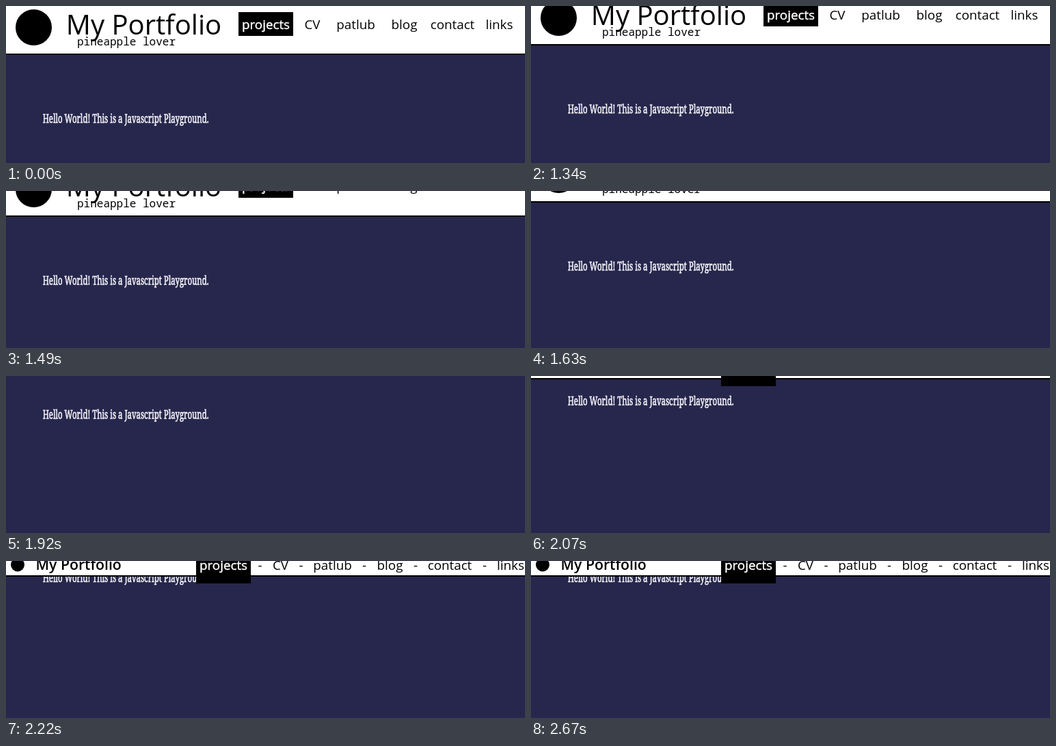
An HTML page that plays this animation: 759 by 231 pixels, repeating every 3.56 s.

```html
<!DOCTYPE html>
<html lang="en">
<head>
<meta charset="utf-8">
<title>My Portfolio</title>
<style>
  html, body { margin: 0; width: 100%; height: 100%; overflow: hidden; background: #27264c; }
  svg { display: block; width: 759px; height: 231px; }
  text { font-family: "Open Sans", "Noto Sans", sans-serif; white-space: pre; }
  .nav { font-size: 18.8px; text-anchor: middle; }
  .active { fill: #fff; stroke: #fff; stroke-width: .45px; }
  .title { font-size: 40px; text-anchor: middle; }
  .small { font-size: 21.2px; font-weight: 600; text-anchor: middle; }
  .tag { font: 16px "Noto Sans Mono", "DejaVu Sans Mono", monospace; }
  .hello {
    font: 11.43px "Noto Serif", serif;
    fill: #f4f4fa; stroke: #f4f4fa; stroke-width: .6px;
    vector-effect: non-scaling-stroke;
  }
  .page { animation: scroll 3560ms step-end infinite; }
  .bar { animation: drop 3560ms step-end infinite; }
  @keyframes scroll {
    0% { transform: translateY(0); }
    37.64% { transform: translateY(-14px); }
    41.85% { transform: translateY(-34px); }
    45.78% { transform: translateY(-55px); }
    50% { transform: translateY(-87px); }
    53.93% { transform: translateY(-109px); }
    58.14% { transform: translateY(-129px); }
    62.35%, 100% { transform: translateY(-141px); }
  }
  @keyframes drop {
    0% { transform: translateY(-60px); }
    58.14% { transform: translateY(-18px); }
    62.35%, 100% { transform: translateY(0); }
  }
</style>
</head>
<body>
<svg viewBox="0 0 759 231">
  <g class="page">
    <rect width="759" height="70" fill="#fff"/>
    <rect y="70" width="759" height="2"/>
    <circle cx="40.5" cy="31.5" r="26.5"/>
    <text class="title" x="201.5" y="41.5">My Portfolio</text>
    <text class="tag" x="104" y="58">pineapple lover</text>
    <rect x="340" y="9" width="80" height="35"/>
    <g class="nav">
      <text class="active" x="380" y="34">projects</text>
      <text x="448" y="34">CV</text>
      <text x="511.5" y="34">patlub</text>
      <text x="582.5" y="34">blog</text>
      <text x="653" y="34">contact</text>
      <text x="721.5" y="34">links</text>
    </g>
    <!-- tall, narrow lettering -->
    <text class="hello" transform="translate(53.8 172) scale(1 1.66)">Hello World! This is a Javascript Playground.</text>
  </g>
  <g class="bar">
    <rect y="-40" width="759" height="61" fill="#fff"/>
    <rect y="21" width="759" height="2"/>
    <circle cx="17" cy="5.5" r="10"/>
    <text class="small" x="106.2" y="13">My Portfolio</text>
    <rect x="278" y="-20" width="80" height="53"/>
    <g class="nav">
      <text class="active" x="318" y="13">projects</text>
      <text x="371.5" y="13">-</text>
      <text x="401.5" y="13">CV</text>
      <text x="431.5" y="13">-</text>
      <text x="477.5" y="13">patlub</text>
      <text x="524" y="13">-</text>
      <text x="561.5" y="13">blog</text>
      <text x="599" y="13">-</text>
      <text x="649" y="13">contact</text>
      <text x="700" y="13">-</text>
      <text x="738" y="13">links</text>
    </g>
  </g>
</svg>
</body>
</html>
```
